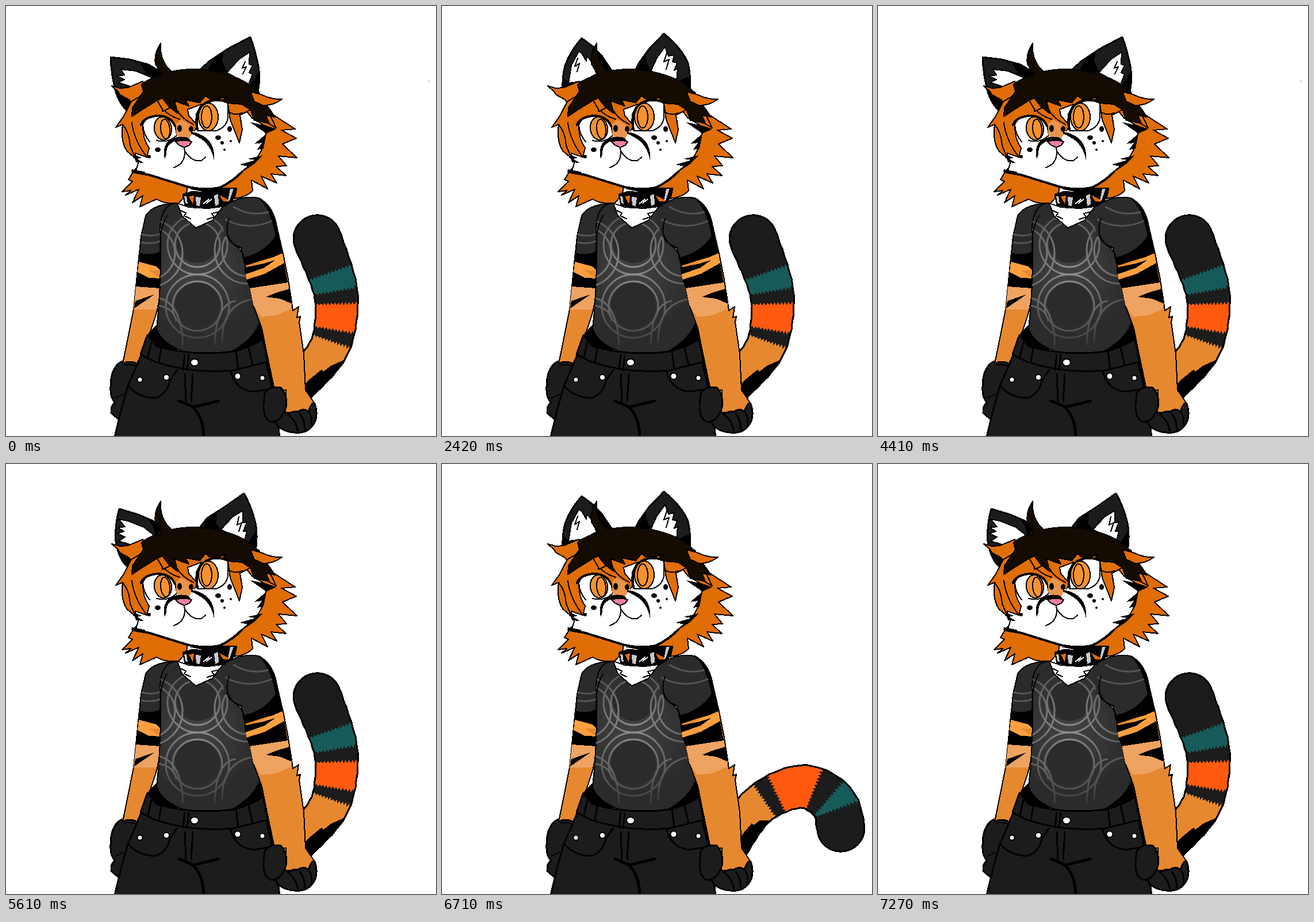
An HTML page that plays this animation: 748x748 px, repeating every 7.34 s.

```html
<!DOCTYPE html>
<html lang="en">
<head>
<meta charset="utf-8">
<title>Tiger idle</title>
<style>
html, body { margin: 0; width: 100%; height: 100%; overflow: hidden; background: #fff; }
svg { display: block; width: 100vw; height: 100vh; shape-rendering: crispEdges; }
.l { stroke: #000; stroke-width: 2; stroke-linejoin: round; stroke-linecap: round; }
.b { stroke-width: 3; }
.n { fill: none; }
.w { fill: #fff; }
.k { fill: #000; }
.d { fill: #1c1c1c; }
.s { fill: #2b2b2b; }
.h { fill: #e06d06; }
.a { fill: #e6882f; }
.u { fill: #ff9f40; }
.p { fill: #eea360; }
.t { fill: #140c02; }
.i { fill: #f5922f; }
.ring { fill: none; stroke: url(#shine); stroke-width: 3; }
.ring, .soft { shape-rendering: auto; }
</style>
</head>
<body>
<svg viewBox="0 0 748 748">
<defs>
  <radialGradient id="glow" gradientUnits="userSpaceOnUse" cx="333" cy="462" r="110">
    <stop offset="0" stop-color="#434343"/><stop offset="1" stop-color="#2b2b2b"/>
  </radialGradient>
  <radialGradient id="shine" gradientUnits="userSpaceOnUse" cx="333" cy="460" r="130">
    <stop offset="0" stop-color="#909090"/><stop offset=".6" stop-color="#666"/><stop offset="1" stop-color="#3c3c3c"/>
  </radialGradient>
  <clipPath id="torso"><path id="torsoShape" d="M297 343Q270 345 268 385Q271 450 266 520L262 562Q272 590 318 604Q362 606 395 600Q437 575 443 543Q431 515 427 485L412 430 385 400 378 346 330 386Z"/></clipPath>
  <clipPath id="sleeves"><path d="M297 343Q255 345 243 365L235 400 232 430Q250 436 268 428L268 385ZM378 350Q410 328 438 334Q458 345 470 400Q448 428 416 438L385 400Z"/></clipPath>
  <clipPath id="eyeL"><path d="M238 212Q240 194 262 191Q286 190 293 208L296 226Q285 237 262 236Q244 234 238 212Z"/></clipPath>
  <clipPath id="eyeR"><path d="M331 214Q328 178 350 167Q370 160 386 168L386 190Q386 212 366 217Q350 222 331 214Z"/></clipPath>
</defs>

<g id="tails"></g>

<!-- ears: down, middle, up -->
<g id="ears">
  <g>
    <path class="d l b" d="M182 89L215 93 248 102 275 118 262 150 212 184Q198 168 190 145Q183 118 182 89ZM425 54L385 75 355 95 336 112 400 150 437 154Q443 130 439 105Q434 78 425 54Z"/>
    <path class="k" d="M187 140L202 150 216 168 211 185Q193 168 187 140ZM232 98L275 115 258 126 244 118ZM380 78L376 94 385 116 350 112 362 92ZM441 112L428 132 420 150 437 154Z"/>
    <path class="w l" d="M200 110L226 113 257 126 240 136 217 140 195 133 206 128 193 122 206 120ZM424 80L405 93 384 116 422 136 429 119 423 116 429 103 423 101Z"/>
    <path class="n l" d="M416 97L411 108 418 106 412 118"/>
    <path class="k" d="M735 130h1v1h-1z"/>
  </g>
  <g>
    <path class="d l b" d="M197 78L230 88 258 100 272 118 255 150 212 180Q195 160 190 130Q191 98 197 78ZM414 51L380 75 350 94 336 112 400 150 434 153Q439 118 432 95Q425 70 414 51Z"/>
    <path class="k" d="M191 140L206 145 218 160 210 180Q195 166 191 140ZM248 96L272 112 260 124 256 110ZM366 84L366 104 375 114 342 112 350 96ZM437 112L424 132 420 148 434 153Z"/>
    <path class="w l" d="M196 96L212 99 240 110 260 126 240 136 222 142 196 134 207 127 194 121 205 117 195 111 207 109ZM412 81L394 92 374 114 415 134 419 117 413 117 419 101 412 102Z"/>
    <path class="n l" d="M405 92L402 106 410 102 405 117"/>
  </g>
  <g>
    <path class="d l b" d="M243 56Q222 80 214 104Q209 122 210 150L245 160 295 112 279 88 262 70ZM386 48L360 75 342 100 334 116 400 150 430 151Q434 128 428 100Q418 74 386 48Z"/>
    <path class="k" d="M210 126L222 132 238 140 211 152ZM262 70L295 110 271 119 259 92ZM354 84L357 100 364 114 338 112ZM433 121L416 128 408 145 430 151Z"/>
    <path class="w l" d="M238 79L225 103 220 134 245 131 269 118 259 95 252 87 251 96 243 82ZM388 71L374 90 362 116 408 131 410 109 404 112 409 99 401 97 404 85 394 87Z"/>
    <path class="n l" d="M236 91L231 105 239 100 235 114M391 82L386 97 395 93 390 110"/>
  </g>
</g>

<!-- back hair and neck -->
<path class="h l" d="M410 150L444 154Q462 163 480 162Q466 173 447 173L466 190 503 214 479 216 505 230 481 240 506 264 474 261 488 278 470 279 487 295 461 292 471 308 444 296 455 318 427 303 429 321Q420 332 396 335L310 342Q280 347 262 336L233 349 238 330 220 342 231 319 208 329 217 321 202 323 220 305 213 302 223 286 240 270 400 240Z"/>
<path class="w l" d="M316 310L314 328 300 343 330 386 378 348 368 312Z"/>
<path class="k" d="M318 318L372 314 364 326 330 329 342 323Z"/>

<!-- left arm -->
<path class="d l b" d="M200 619Q182 630 182 662Q181 682 190 690Q182 694 183 708L197 720 214 660 238 610Z"/>
<path class="n l" d="M190 682L204 676M206 624Q224 622 232 630"/>
<path class="a l" d="M232 428L226 488 222 528 203 622Q215 615 228 622L236 604 249 573 263 530 270 450 268 426Z"/>
<path class="p" d="M226 488L267 489 265 515 262 528 222 528Z"/>
<path class="k" d="M232 428L270 428 268 459 246 450 230 444ZM229 460L248 465 262 471 240 472 268 474 268 491 226 488ZM225 513L258 502 242 513 223 526Z"/>
<path class="u" d="M231 445L262 453 268 460 248 460 267 473 247 472 229 463Z"/>

<!-- shirt -->
<path class="k" d="M248 568L262 555 300 595 290 606 246 590ZM428 505L447 560 456 612 468 672 440 640 390 606 412 580Z"/>
<path class="s l" d="M299 343Q255 344 243 365L235 400 232 430Q250 436 268 428L272 385Z"/>
<use href="#torsoShape" fill="url(#glow)" class="l"/>
<g clip-path="url(#torso)">
  <circle class="s" cx="333" cy="411" r="36"/><circle class="s" cx="333" cy="520" r="39"/>
  <g class="ring">
    <circle cx="333" cy="415" r="39"/><circle cx="333" cy="415" r="52"/>
    <circle cx="333" cy="522" r="43"/><circle cx="333" cy="522" r="55"/>
    <circle cx="248" cy="430" r="46"/><circle cx="248" cy="430" r="59"/>
    <circle cx="421" cy="425" r="45"/><circle cx="421" cy="425" r="58"/>
    <path d="M264 508Q305 515 308 590M264 521Q292 525 296 548M400 513Q365 518 363 590M428 510Q375 520 376 585"/>
  </g>
</g>
<path class="n l" d="M268 430Q266 390 280 365"/>

<!-- right arm -->
<path class="a l" d="M412 436L424 485 430 520 445 560 455 610 468 672 487 668 486 707 525 708 536 690 521 668 518 605 510 550 512 540 506 542 509 523 499 530 497 515 490 470 482 430 472 402Z"/>
<path class="p" d="M424 489L490 479 497 516 496 527 470 538 444 541 430 520Z"/>
<path class="k l" d="M440 334Q460 345 468 370Q475 400 482 431L450 440 416 451 412 432Z"/>
<path class="u" d="M416 460L446 445 481 430 485 458 450 465 419 478Z"/>
<path class="k" d="M415 455L448 448 468 442 450 455 416 467ZM418 476L450 466 484 447 490 481 470 484 424 491ZM493 492L472 498 452 506 476 509 498 518Z"/>
<path class="s l" d="M378 350Q405 328 440 334Q460 350 470 400Q450 430 414 438L408 420Q388 412 385 400"/>
<path class="s" d="M372 349L380 344 400 410 380 400Z"/>
<g clip-path="url(#sleeves)" class="ring">
  <path d="M235 397Q256 403 275 394M235 411Q258 416 277 405M395 349Q430 370 466 355M381 371Q420 393 465 373" stroke="#555"/>
</g>
<path class="n l" d="M388 370Q380 393 390 407Q398 420 410 421"/>
<path class="w l" d="M298 343L306 365 330 386 359 373 378 348 350 352 318 350Z"/>
<path class="n l" d="M302 355L313 360 310 365 321 370M370 358L358 361 362 367 350 371"/>

<!-- trousers -->
<path class="d l b" d="M236 606L212 661 201 700 189 750 476 750 466 676 452 618Z"/>
<path class="d l b" d="M246 572L234 606 257 618Q320 640 395 634L455 619 447 579Q430 592 396 601Q325 610 262 592Z"/>
<g class="n l">
  <path class="b" d="M253 585L247 610M270 596L266 620M311 606L308 633M318 607L315 634M400 600L404 632M422 594L429 625M311 640L313 690M325 640L322 688M213 662Q235 684 263 681Q281 672 285 652L298 633M391 636Q398 667 430 671L463 666"/>
  <path style="stroke-width:5" d="M301 687L325 697Q343 716 344 748M324 698L370 687"/>
</g>
<g class="w l soft">
  <ellipse cx="328" cy="620" rx="7" ry="6"/><circle cx="279" cy="646" r="5"/><circle cx="233" cy="650" r="4.5"/><circle cx="403" cy="644" r="5.5"/><circle cx="446" cy="647" r="4.5"/>
</g>

<!-- right hand -->
<g class="d l b">
  <path d="M462 715Q478 700 490 710Q500 704 508 706Q518 698 526 706Q530 692 536 690Q543 706 538 722Q530 740 512 742Q490 744 474 732Z"/>
  <path d="M450 674Q458 660 478 664Q490 675 487 698Q480 722 462 724Q447 718 448 694Z"/>
  <path class="n" d="M490 710Q504 720 508 740M511 709Q521 722 519 738M528 708Q534 718 531 730"/>
</g>

<!-- collar -->
<path class="k l b" d="M308 328L325 323 350 326 372 317 401 317 397 334 380 348 348 352 312 346Z"/>
<path fill="#c9c9c9" d="M330 332L339 333 337 348 331 347ZM362 330L369 327 370 345 364 348ZM390 318L396 318 389 338 386 339ZM310 331L314 331 316 344 312 343Z"/>
<path class="h" d="M318 331L327 330 325 345 321 337ZM371 329L383 335 388 340 378 340Z"/>
<path class="n" stroke="#fff" stroke-width="2" d="M343 344L352 337 350 342 358 336"/>

<!-- face -->
<path class="w l" d="M224 200L222 263 231 269 226 288 250 294Q290 306 318 315Q346 321 372 316Q398 303 411 288L437 264 446 248 452 222 453 210 428 195 400 160 300 150Z"/>
<path class="n l" style="stroke-width:4" d="M220 288L250 294Q288 306 318 315Q346 321 372 316Q396 304 411 288"/>
<path class="k" d="M424 202L452 208 470 214 453 222 446 217ZM453 222L432 240 445 238 437 250 448 248ZM446 260L420 266 434 268 406 276 422 279 406 292 430 276ZM222 258L236 264 228 266 240 273 226 272ZM218 284L240 288 250 296 222 291Z"/>

<path class="h l" d="M184 139L198 143 212 142 238 131 245 150 225 178 214 163 198 154 195 149Z"/>
<path class="h l" d="M218 166L204 193 191 211 203 206Q199 235 210 252L224 264 225 256 245 263 249 247Q238 232 238 208Q240 195 262 191Q286 190 294 208L297 224 318 225 331 213Q328 178 350 167Q369 160 386 169L390 198 406 238 411 215 407 190 426 180 434 196 456 204 470 212 440 150 400 130 280 130Z"/>
<path fill="#e9944d" d="M296 206L304 197 318 205 328 215 319 230 300 230 296 222Z"/>
<path class="w l" d="M316 180L340 171 331 188 330 204 318 191Z"/>
<path class="n l" d="M203 207Q214 218 216 243L224 262M219 203Q222 232 245 263M272 178Q284 192 302 197M299 183Q306 196 326 206M388 185Q400 191 411 186"/>
<path class="t l" d="M269 65Q257 83 260 101L272 121Q250 124 236 137L239 149 220 177 219 192 242 177 263 164 272 166 272 183 286 177 299 187 293 165 318 174 312 163 337 168 347 156 357 164 384 158 372 168 411 171 426 181 432 199 458 204 452 190 468 193Q452 170 440 152Q420 129 384 119Q335 104 288 114Q267 96 269 65Z"/>
<path class="h l" d="M263 164L272 160 285 177 274 183ZM425 149L444 154Q462 163 480 162Q466 173 447 173L432 166Z"/>

<!-- eyes -->
<g clip-path="url(#eyeL)">
  <path class="w" d="M230 185h70v55h-70z"/>
  <ellipse class="i l" cx="273" cy="213" rx="15" ry="20" transform="rotate(-9 273 213)"/>
  <ellipse class="i l" cx="277" cy="214" rx="8" ry="17" transform="rotate(-6 277 214)"/>
  <path class="h l lid" d="M225 120H302V231L288 233Q265 237 248 242L225 243Z"/>
</g>
<g clip-path="url(#eyeR)">
  <path class="w" d="M325 160h65v60h-65z"/>
  <ellipse class="i l" cx="352" cy="193" rx="17" ry="24"/>
  <ellipse class="i l" cx="349" cy="193" rx="9" ry="19"/>
  <path class="h l lid" d="M322 100H395V212L362 214 336 225H322Z"/>
</g>
<path class="n l" style="stroke-width:4" d="M235 207Q239 194 262 191Q286 190 294 209M333 215Q327 179 350 167Q369 160 386 168"/>
<path class="n l" d="M386 168L386 195Q383 211 366 217L334 217M262 234Q282 239 296 226M238 207Q240 226 250 236"/>

<!-- muzzle -->
<path class="k" d="M276 266Q271 240 288 231Q302 225 316 229L322 234Q303 231 290 237Q278 243 279 258ZM322 219Q346 222 357 240Q364 254 362 269Q358 246 343 234Q334 227 322 222Z"/>
<path class="l" fill="#ee7fa0" d="M295 236Q309 231 323 236L319 242 310 246 301 242Z"/>
<path class="n l" d="M310 246Q315 273 292 281M311 252Q323 272 340 269L347 263"/>
<g class="k soft">
  <ellipse cx="302" cy="213" rx="4" ry="6"/><ellipse cx="322" cy="214" rx="4" ry="5"/>
  <ellipse cx="264" cy="250" rx="5" ry="4"/><ellipse cx="249" cy="262" rx="3" ry="3"/>
  <ellipse cx="369" cy="229" rx="5" ry="4"/><ellipse cx="389" cy="214" rx="4" ry="5"/><circle cx="376" cy="238" r="3"/><circle cx="380" cy="250" r="2"/><circle cx="391" cy="235" r="2"/>
</g>
</svg>

<script>
const LOOP = 7340;
const ears = [...document.querySelector('#ears').children];
const lids = document.querySelectorAll('.lid');
const tailBox = document.querySelector('#tails');

// raised, swing out, lowest, curl back, return;
// cuts: end of the body, orange band, teal band as shares of the length
const poses = [
  { spine: [[500, 668], [556, 605], [573, 553], [572, 490], [541, 404]], cuts: [.36, .43, .585, .66, .775] },
  { spine: [[505, 645], [566, 614], [606, 585], [635, 540], [661, 474]], cuts: [.29, .385, .53, .605, .73] },
  { spine: [[505, 642], [565, 628], [612, 628], [660, 645], [700, 682]], cuts: [.33, .41, .56, .64, .76] },
  { spine: [[500, 668], [550, 594], [625, 561], [680, 588], [694, 634]], cuts: [.355, .44, .68, .787, .87] },
  { spine: [[500, 668], [552, 598], [580, 540], [618, 480], [668, 452]], cuts: [.35, .43, .62, .71, .82] }
];

function spineOf(pts) {
  let d = 'M' + pts[0];
  for (let i = 0; i < pts.length - 1; i++) {
    const a = pts[i - 1] || pts[i], b = pts[i], c = pts[i + 1], e = pts[i + 2] || c;
    const near = b.map((v, k) => v + (c[k] - a[k]) / 6);
    const far = c.map((v, k) => v - (e[k] - b[k]) / 6);
    d += `C${near} ${far} ${c}`;
  }
  const path = document.createElementNS('http://www.w3.org/2000/svg', 'path');
  path.setAttribute('d', d);
  return path;
}

function drawTail({ spine: pts, cuts }) {
  const spine = spineOf(pts), len = spine.getTotalLength();
  const width = f => 30 + 11 * f;
  const frame = f => {
    const at = spine.getPointAtLength(len * f);
    const a = spine.getPointAtLength(len * f - 2), b = spine.getPointAtLength(len * f + 2);
    const m = Math.hypot(b.x - a.x, b.y - a.y) || 1;
    return { at, tx: (b.x - a.x) / m, ty: (b.y - a.y) / m };
  };
  // k runs from -1 to 1 across the tail
  const pos = (f, k, fuzz = 0) => {
    const { at, tx, ty } = frame(f), w = (width(f) + fuzz) * k;
    return [at.x - ty * w, at.y + tx * w].map(v => v.toFixed(1));
  };
  const side = (from, to, k, fuzz = 0) => Array.from({ length: 25 }, (_, i) =>
    pos(from + (to - from) * i / 24, k, i % 2 * fuzz));
  const teeth = (f, dir) => Array.from({ length: 25 }, (_, i) =>
    pos(f + (i % 2 ? .016 : 0), dir * (i / 12 - 1)));
  const shape = (points, look) => `<path d="M${points.join('L')}Z" ${look}/>`;
  const band = (from, to, color) => shape(
    [...teeth(from, 1), ...side(from, to, 1), ...teeth(to, -1), ...side(to, from, -1)], `fill="${color}"`);

  const { at, tx, ty } = frame(1), r = width(1);
  const cap = Array.from({ length: 24 }, (_, i) => {
    const t = Math.PI * (i + 1) / 25, c = Math.cos(t) * r, s = Math.sin(t) * (r - 1);
    return [at.x + ty * c + tx * s, at.y - tx * c + ty * s].map(v => v.toFixed(1));
  });
  const edge = [...side(0, 1, -1, 1), ...cap, ...side(1, 0, 1, 1)];
  const mark = [...side(0, .31, 1), pos(.25, .6), pos(.2, .5), pos(.2, .35), pos(.12, .25), pos(0, .2)];
  const [body, o1, o2, t1, t2] = cuts;
  return '<g>' + shape(edge, 'class="d"') + band(0, body, '#e6882f') + band(o1, o2, '#ff5a0f')
    + band(t1, t2, '#175a5a') + shape(mark, 'class="k"') + shape(edge, 'class="n l b"') + '</g>';
}

tailBox.innerHTML = poses.map(drawTail).join('');
const tails = [...tailBox.children];

const blinkAt = [2070, 5750, 6150];
const wagAt = [4090, 6550, 6950];
const closing = [.25, .55, .78, 1, .78, .55, .25];
const earSteps = [[0, 0], [1200, 1], [1270, 2], [3220, 1], [3290, 0], [5610, 1], [5690, 2], [7270, 1]];

const stepOf = (starts, t, ms, count) => {
  const s = starts.find(v => t >= v && t < v + ms * count);
  return s === undefined ? -1 : Math.floor((t - s) / ms);
};
const show = (list, n) => list.forEach((el, i) => { el.style.display = i === n ? '' : 'none'; });

function render() {
  const t = performance.now() % LOOP;
  show(ears, earSteps.filter(s => s[0] <= t).pop()[1]);
  show(tails, stepOf(wagAt, t, 80, 4) + 1);
  const shut = closing[stepOf(blinkAt, t, 50, 7)] || 0;
  lids.forEach(lid => {
    lid.style.display = shut ? '' : 'none';
    lid.setAttribute('transform', `translate(0 ${-48 * (1 - shut)})`);
  });
  requestAnimationFrame(render);
}
render();
</script>
</body>
</html>
```
